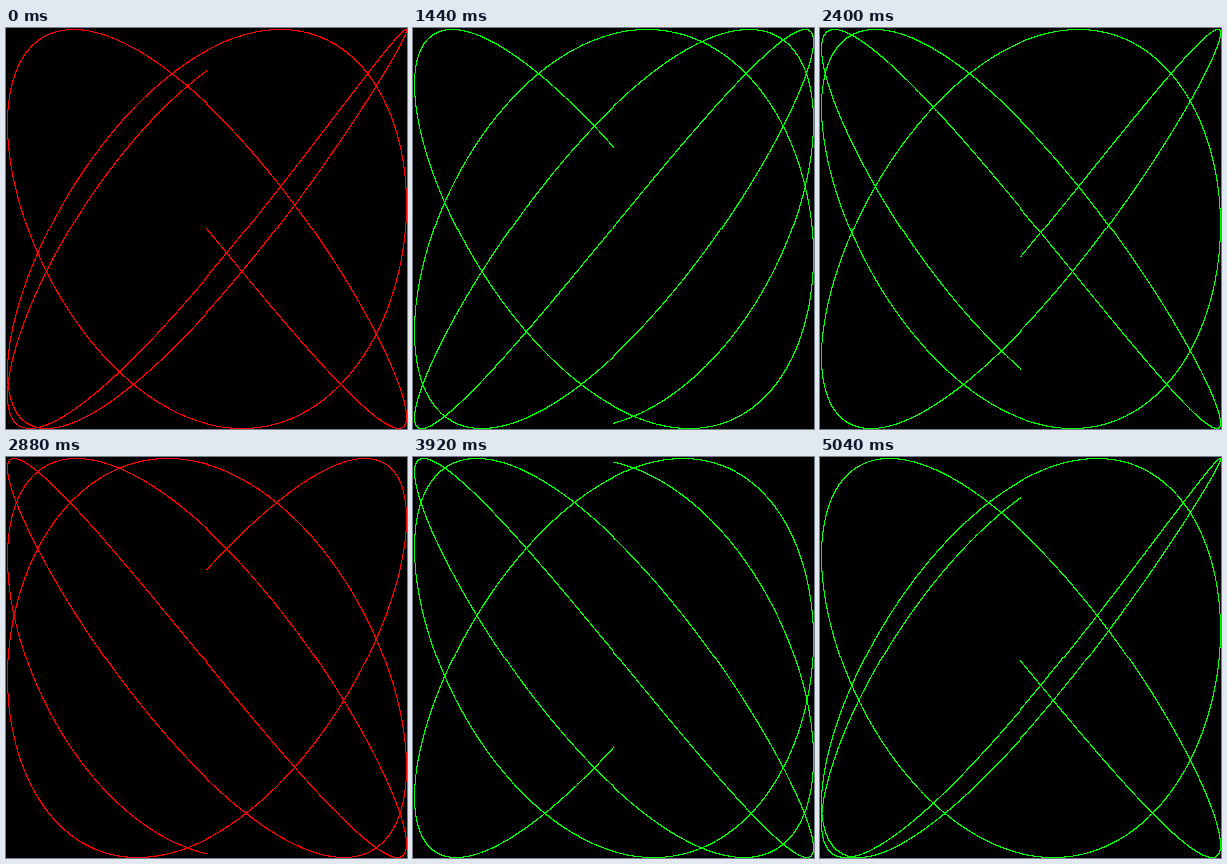
These frames come from a looping animation (401x401 px, 5120 ms). An HTML page with a canvas:

```html
<!DOCTYPE html>
<html lang="en">
<head>
<meta charset="utf-8">
<title>Lissajous</title>
<style>
html, body { margin: 0; width: 100%; height: 100%; overflow: hidden; background: #000; }
canvas { display: block; width: 401px; height: 401px; image-rendering: pixelated; }
</style>
</head>
<body>
<canvas id="stage" width="401" height="401"></canvas>
<script>
const SIZE = 200;
const SIDE = 2 * SIZE + 1;
const STEPS = 64;
const DELAY = 80;
const CYCLES = 3;
const RES = 0.001;
const FREQ = 1.21557;
const PHASE_STEP = 0.1;
const COLORS = ['#f00', '#0f0'];
const COLOR_RUN = 16;

const ctx = document.getElementById('stage').getContext('2d');

// Truncating toward zero keeps the small kinks on the centre lines.
const toPixel = v => SIZE + Math.trunc(v * SIZE + 0.5);

function draw(step) {
  const phase = step * PHASE_STEP;
  ctx.fillStyle = '#000';
  ctx.fillRect(0, 0, SIDE, SIDE);
  ctx.fillStyle = COLORS[Math.floor(step / COLOR_RUN) % COLORS.length];
  let lastX = -1, lastY = -1;
  for (let t = 0; t < CYCLES * 2 * Math.PI; t += RES) {
    const x = toPixel(Math.sin(t));
    const y = toPixel(Math.sin(t * FREQ + phase));
    if (x === lastX && y === lastY) continue;
    ctx.fillRect(x, y, 1, 1);
    lastX = x;
    lastY = y;
  }
}

let shown = -1;
const start = performance.now();

function tick() {
  const step = Math.floor((performance.now() - start) / DELAY) % STEPS;
  if (step !== shown) draw(shown = step);
  requestAnimationFrame(tick);
}
tick();
</script>
</body>
</html>
```
